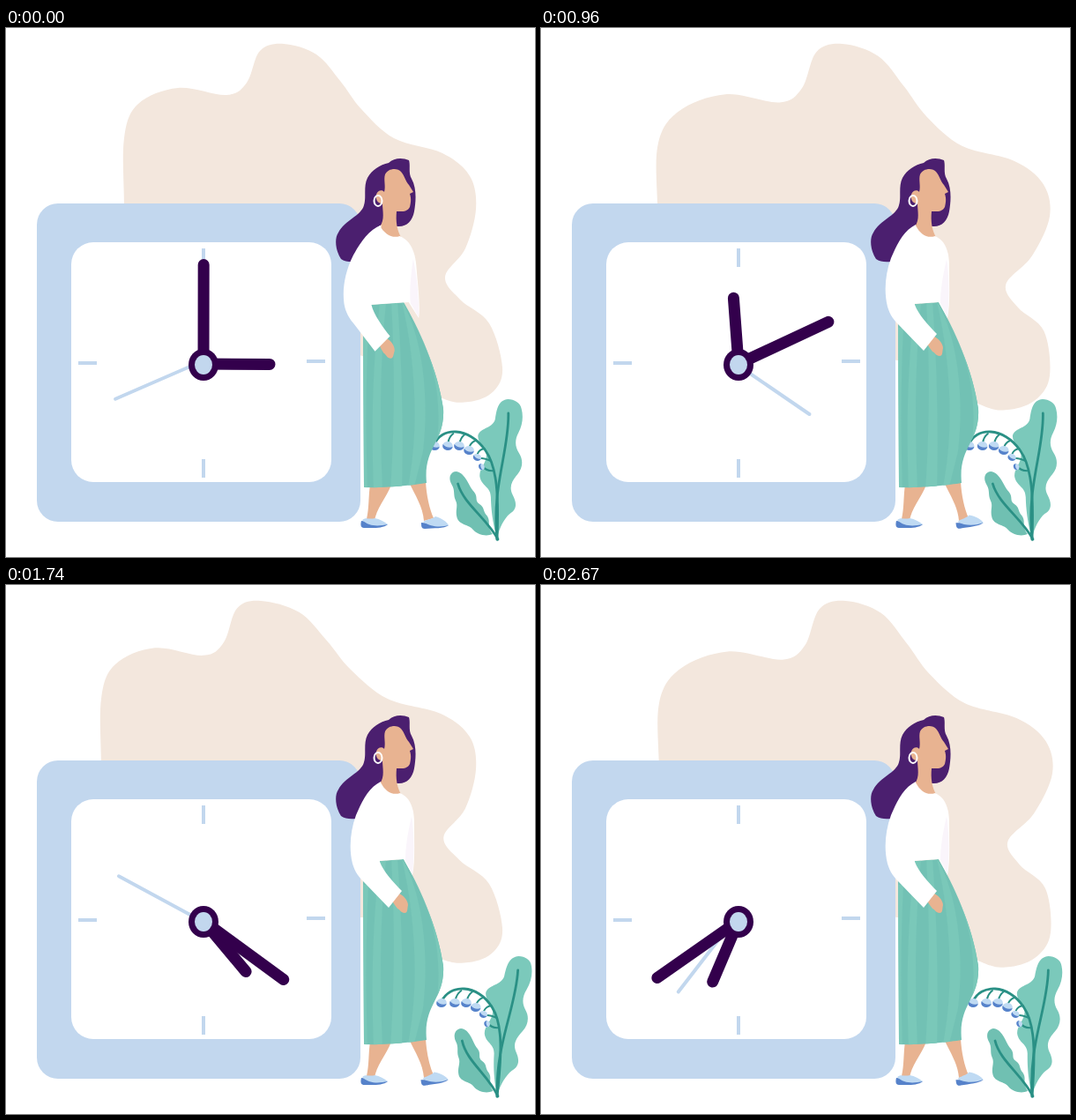
These frames come from a looping animation (600 px wide and 600 px high, 2.7 s). An HTML page:

```html
<!DOCTYPE html>
<html lang="en">
<head>
<meta charset="utf-8">
<title>Waiting by the clock</title>
<style>
html, body { margin: 0; width: 100%; height: 100%; overflow: hidden; background: #fff; }
svg { display: block; width: 100vw; height: 100vh; }
.sky { fill: #c2d7ee; }
.tick, .hand { fill: none; stroke: #c2d7ee; stroke-width: 4; }
.hand { stroke-linecap: round; }
.dark { stroke: #33004c; stroke-width: 13; }
.skin { fill: #e8b391; }
.hair { fill: #4b1f6f; }
.white { fill: #fff; }
.shade { fill: #faf5fb; }
.blue { fill: #5682ca; }
.pale { fill: #bfdaf3; }
.leaf { fill: #7bc9bb; }
.low { fill: #70c0b2; }
.vein { fill: none; stroke: #2a9085; stroke-width: 2.8; stroke-linecap: round; }
.thin { stroke-width: 2; }
</style>
</head>
<body>
<svg viewBox="0 0 600 600">
  <defs>
    <path id="skirt" d="M413 314L451 311C468 340 490 388 496 432C498 470 473 475 477 516Q440 522 406 521L405 335Z"/>
    <clipPath id="cut"><use href="#skirt"/></clipPath>
    <g id="bell">
      <path class="pale" d="M-6 -2C-4 -6 4 -6 5 -1C6 3 3 5 0 5C-4 5 -7 3 -6 -2Z"/>
      <path class="blue" d="M-6 -2C-4 1 1 3 5 1C4 5 -1 6 -4 4C-6 3 -7 1 -6 -2Z"/>
    </g>
  </defs>

  <path id="blob" fill="#f3e7dd"/>

  <rect class="sky" x="35" y="199" width="367" height="361" rx="24"/>
  <rect class="white" x="74" y="243" width="295" height="272" rx="25"/>
  <path class="tick" d="M224 250V271M224 489V510M82 380H103M341 378H362"/>
  <path id="second" class="hand" d="M219 379.5V276"/>
  <path id="hour" class="hand dark" d="M224 381V306"/>
  <path id="minute" class="hand dark" d="M224 381V268.5"/>
  <ellipse cx="224" cy="382" rx="17" ry="18" fill="#33004c"/>
  <ellipse class="sky" cx="224" cy="382" rx="10" ry="11"/>

  <path class="white" d="M402 377H408V522H402Z"/>

  <g id="plant">
    <path class="leaf" d="M573 421C562 422 560 432 558 443C556 454 541 453 538 462C537 471 547 476 547 484C547 494 538 500 539 509C541 520 551 520 551 532C551 545 552 560 557 579C560 566 566 556 572 551C581 546 580 538 576 530C571 520 576 513 582 506C588 499 589 490 584 482C579 474 580 466 584 459C589 450 590 440 588 432C587 425 580 421 573 421Z"/>
    <path class="vein" d="M573 437C573 480 552 520 557 580"/>
    <path class="leaf low" d="M512 503C505 504 503 511 507 518C511 525 508 529 511 536C514 542 510 547 512 555C514 564 526 563 530 569C535 575 545 577 552 574C545 564 551 560 546 553C541 547 544 544 538 540C532 536 537 532 532 526C526 520 523 504 512 503Z"/>
    <path class="vein" d="M514 517C520 540 546 556 558 580"/>
    <path class="vein" d="M557 580C560 530 559 498 546 479C528 452 496 452 488 473"/>
    <path class="vein thin" d="M510 460Q505 464 504 470M523 461Q518 465 517 471M535 468Q530 470 528 475M545 477Q539 478 537 483M552 491Q545 488 541 488M555 502Q547 503 542 497"/>
    <use href="#bell" x="489" y="474"/>
    <use href="#bell" x="504" y="474"/>
    <use href="#bell" x="517" y="474"/>
    <use href="#bell" x="528" y="479"/>
    <use href="#bell" transform="translate(537 487) rotate(15) scale(.8)"/>
    <use href="#bell" transform="translate(541.5 498) rotate(60) scale(.65)"/>
  </g>

  <path class="skin" d="M413 518H437C432 532 419 546 418 560L409 557C412 545 411 530 413 518Z"/>
  <path class="skin" d="M457 515H476C477 530 480 545 485 556L474 559C473 543 464 530 457 515Z"/>
  <path class="blue" d="M403 559C402 563 402 567 406 567C415 567 427 568 433 563Z"/>
  <path class="pale" d="M404 558C408 554 413 558 418 556C424 557 429 560 433 563C423 565 412 566 404 558Z"/>
  <g id="shoe">
    <path class="blue" d="M471 561C471 565 471 568 475 568C485 567 497 568 502 564Z"/>
    <path class="pale" d="M473 560C478 557 484 557 487 554C494 556 500 560 502 564C495 566 483 567 473 560Z"/>
  </g>

  <use href="#skirt" fill="#72c1b4"/>
  <g clip-path="url(#cut)" fill="#7ac8b9">
    <path d="M424 312L431 312C424 380 424 450 427 525H417C414 450 416 380 424 312Z"/>
    <path d="M437 310L444 310C449 380 451 450 449 525H436C441 450 441 380 437 310Z"/>
    <path d="M449 310C470 345 481 410 473 480L463 520H456C470 450 463 370 449 310Z"/>
    <path d="M405 340H411C408 400 408 460 410 525H405Z"/>
    <path d="M462 330C487 380 494 420 489 470L500 450V380Z"/>
  </g>

  <path class="hair" d="M434 153C440 147 450 147 457 150C459 156 456 164 460 171C466 182 465 196 463 208C461 219 454 226 444 225L428 222C418 230 410 246 402 264C395 266 385 266 380 262C374 253 372 239 377 232C384 218 403 213 406 201C409 192 405 180 410 170C415 161 424 155 434 153Z"/>
  <path class="skin" d="M430 166C433 159 444 158 448 163C452 167 453 174 457 178L462 186L458 188C460 194 459 199 458 203C455 209 449 208 443 208C442 219 443 229 449 239C440 244 429 235 424 225C430 218 427 207 427 199C421 199 419 194 420 189C421 184 427 183 429 186C431 179 428 172 430 166Z"/>
  <ellipse cx="422" cy="196" rx="4.5" ry="6" fill="none" stroke="#fff" stroke-width="2"/>
  <g id="torso">
    <path class="white" d="M425 224C430 234 438 239 447 236C458 241 463 252 463 270C463 295 464 315 461 329L451 311L406 314C408 290 412 240 425 224Z"/>
    <path class="shade" d="M460 262C455 285 453 298 453 312L461 328C463 310 463 280 460 262Z"/>
  </g>
  <g id="arm">
    <path class="skin" d="M438 358L446 350C451 352 456 358 456 363C455 367 456 372 452 372C448 372 447 368 444 367C442 364 440 362 438 358Z"/>
    <path class="white" d="M425 223C411 230 404 245 397 261C390 280 389 300 393 316C396 326 400 331 406 337L434 366L449 347C440 338 428 325 424 314C421 290 424 260 425 223Z"/>
  </g>
</svg>
<script>
const LOOP = 2700;
const { PI, abs, cos, exp, max, min } = Math;
const $ = id => document.getElementById(id);
const turn = (id, angle, x, y) => $(id).setAttribute('transform', `rotate(${angle} ${x} ${y})`);
const skew = (id, k, y) => $(id).setAttribute('transform', `matrix(1 0 ${k} 1 ${-k * y} 0)`);
const smooth = u => { u = min(1, max(0, u)); return u * u * (3 - 2 * u); };

// Smooth curve through a few [time, value] keys
function curve(...keys) {
  const last = keys.length - 1;
  const slope = i => {
    const a = keys[max(i - 1, 0)], b = keys[min(i + 1, last)];
    return (b[1] - a[1]) / (b[0] - a[0]);
  };
  return t => {
    t = min(t, keys[last][0]);
    let i = 0;
    while (t > keys[i + 1][0]) i++;
    const [t0, v0] = keys[i], [t1, v1] = keys[i + 1];
    const d = t1 - t0, u = (t - t0) / d, w = 1 - u;
    return w * w * ((1 + 2 * u) * v0 + u * d * slope(i)) +
           u * u * ((3 - 2 * u) * v1 - w * d * slope(i + 1));
  };
}

const minute = curve([0, 0], [420, 37], [690, 51], [1230, 82], [2190, 171], [2670, 235]);
const hour = curve([0, 90], [420, 219], [690, 284], [1230, 421], [1740, 500], [2670, 563]);
// Steady sweep after a short springy start
const second = t => 180 + .688 * t + 66 * exp(-t / 380) * cos(PI * t / 420);
const sway = t => 1.5 + 7 * cos(2 * PI * (t - 470) / 1240);

const blob = [[134, 205], [134, 125], [150, 86], [195, 68], [250, 76], [273, 62], [288, 26], [315, 18],
  [352, 30], [379, 60], [403, 92], [440, 125], [495, 142], [526, 168], [533, 205], [521, 250],
  [498, 282], [515, 308], [548, 335], [563, 385], [553, 412], [525, 424], [490, 418], [404, 372], [134, 300]];

// Pull the right side out by `wide` and the left side out by `left`
function warp([x, y], wide, left) {
  const reach = ((x - 134) / 400) ** .55 * min(1, 1 - (y - 205) / 260);
  const pull = min(1, max(0, (533 - x) / 218)) ** 1.5;
  const drop = min(1, (y - 18) / 60);
  return [x + 47 * wide * reach - 26 * left * pull, y + (9 * wide + 4 * left) * drop];
}

// Closed smooth outline through points
function outline(pts) {
  const n = pts.length, at = i => pts[(i + n) % n];
  return pts.reduce((d, b, i) => {
    const a = at(i - 1), c = at(i + 1), e = at(i + 2);
    return d + `C${b.map((v, k) => v + (c[k] - a[k]) / 6)} ${c.map((v, k) => v - (e[k] - b[k]) / 6)} ${c}`;
  }, `M${pts[0]}`) + 'Z';
}

const start = performance.now();

function draw() {
  const t = (performance.now() - start) % LOOP;
  turn('minute', minute(t), 224, 381);
  turn('hour', hour(t), 224, 381);
  turn('second', second(t), 219, 379.5);

  const left = cos(PI / 2 * min(1, abs(t - 1740) / 930)) ** 2;
  const wide = min(t / 980, 1 - left);
  $('blob').setAttribute('d', outline(blob.map(p => warp(p, wide, left))));

  skew('plant', -sway(t) / 158, 580);

  const rest = smooth(t / 950);
  turn('arm', 6.5 * (1 - rest), 420, 230);
  skew('torso', .08 * (1 - rest), 240);
  turn('shoe', -6 * smooth((t - 420) / 270), 473, 566);
  requestAnimationFrame(draw);
}
draw();
</script>
</body>
</html>
```
